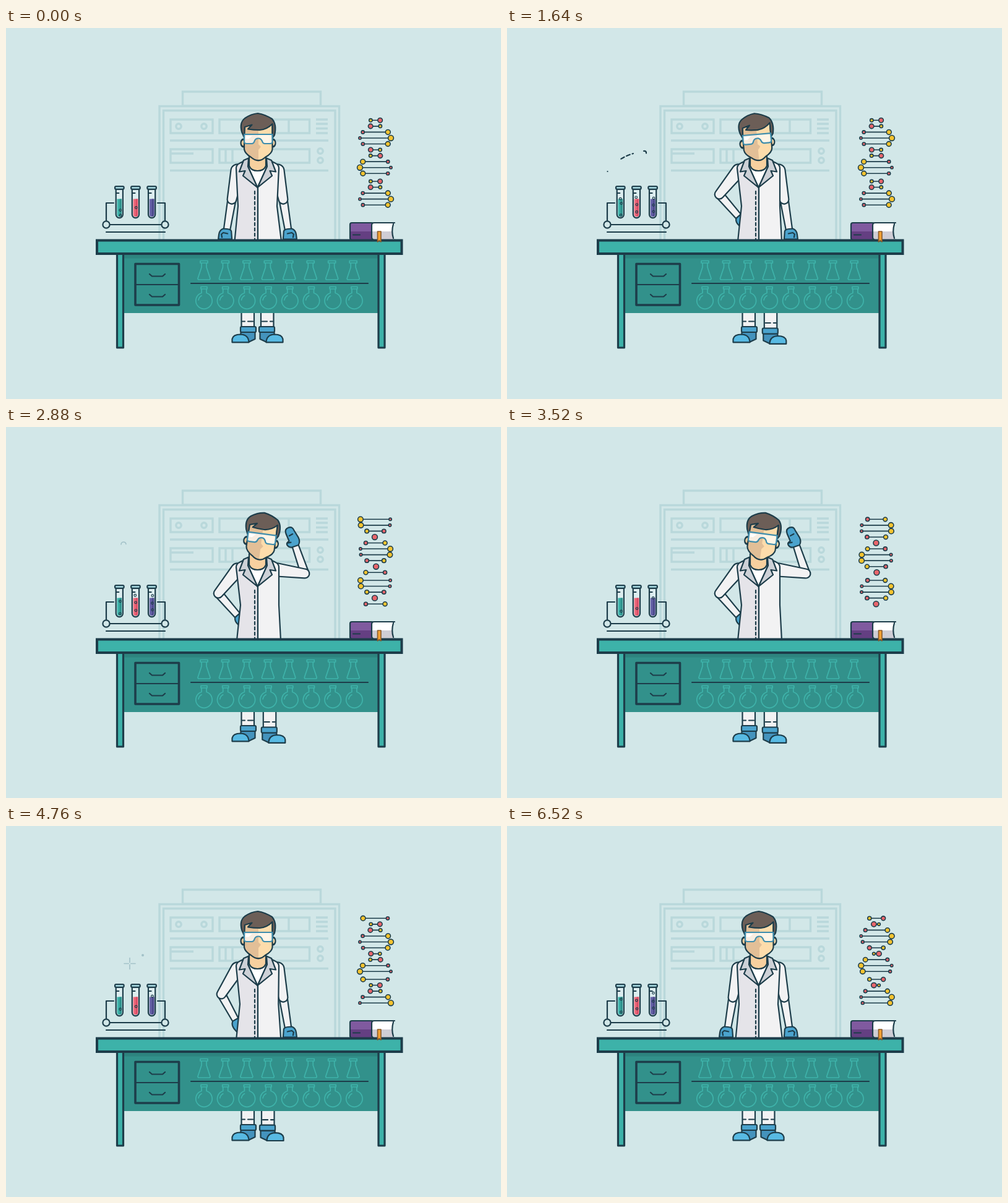
Recreate the animation shown at these times as an HTML page. Size 800 by 600 pixels, loop 6.56 s.

```html
<!DOCTYPE html>
<html lang="en">
<head>
<meta charset="utf-8">
<title>Laboratory</title>
<style>
html, body { margin: 0; width: 100%; height: 100%; overflow: hidden; background: #d2e7e8; }
svg { display: block; width: 800px; height: 600px; }
.ink { stroke: #1d3d4a; stroke-width: 2.2; stroke-linejoin: round; stroke-linecap: round; }
.line { fill: none; }
.pale { fill: none; stroke: #b9d8db; stroke-width: 3.4; }
.glass { fill: none; stroke: #3fb3aa; stroke-width: 1.7; stroke-linejoin: round; stroke-linecap: round; }
.spark { fill: none; stroke: #a2c1c8; stroke-width: 1.6; stroke-linecap: round; }
</style>
</head>
<body>
<svg id="stage" viewBox="0 0 800 600"></svg>
<script>
const LOOP = 6560, SPIN = 1640, FIZZ = 1200;
const YELLOW = '#f5c32f', RED = '#e8656b', COAT = '#f2f2f3', GLOVE = '#4ba3cd';

const path = (d, fill = 'none', cls = 'ink', more = '') =>
  `<path class="${cls}" d="${d}" fill="${fill}" ${more}/>`;
const rect = (x, y, w, h, fill = 'none', cls = 'ink', more = '') =>
  `<rect class="${cls}" x="${x}" y="${y}" width="${w}" height="${h}" fill="${fill}" ${more}/>`;
const circle = (x, y, r, fill = 'none', cls = 'ink', more = '') =>
  `<circle class="${cls}" cx="${x}" cy="${y}" r="${r}" fill="${fill}" ${more}/>`;
const group = (body, transform) => `<g transform="${transform}">${body}</g>`;
const mirror = body => group(body, 'translate(813 0) scale(-1 1)');

function machine() {
  const boxes = [[285.5, 103, 223, 23], [266, 148, 68, 22], [345, 148, 145.5, 22],
    [266, 196, 68, 22], [345, 196, 145.5, 22]];
  const dots = [[279, 159], [320, 159], [508, 199], [508, 214]];
  return path('M248 343V126.500H538.500V343M254.500 343V133.500H532V343M457 148V170M355 196V218M366 196V218' +
      'M266 203H303M265 182H521M265 230.500H521' +
      [148, 155, 162.5, 170].map(y => `M501 ${y}H520`).join(''), 'none', 'pale') +
    boxes.map(b => rect(...b, 'none', 'pale')).join('') +
    dots.map(([x, y]) => circle(x, y, 4.2, 'none', 'pale')).join('');
}

function desk() {
  let s = rect(189, 365, 413, 96, '#32918b', '') + rect(189, 366, 413, 6.5, '#2d847f', '');
  s += rect(179.5, 364, 10, 153, '#3db2a9', 'ink', 'style="stroke-width:3.2"');
  s += rect(602, 364, 10, 153, '#3db2a9', 'ink', 'style="stroke-width:3.2"');
  s += rect(147, 343.5, 492.5, 21.5, '#3db2a9', 'ink', 'style="stroke-width:4;stroke-linejoin:miter"');
  s += rect(209, 381.5, 70.5, 66.5, 'none', 'ink', 'style="stroke-width:3.6"');
  s += path('M209 415H279M232 398l4 3.500h17l4 -3.500M232 431l4 3.500h17l4 -3.500M299 413H585');
  for (let i = 0; i < 8; i++) {
    const x = 320 + i * 34.45, r = 320 + i * 34.7;
    s += path(`M${x - 6} 376.500h12v3.500h-12zM${x - 4} 380V387L${x - 10} 405Q${x - 10} 407 ${x - 8} 407` +
      `H${x + 8}Q${x + 10} 407 ${x + 10} 405L${x + 4} 387V380`, 'none', 'glass');
    s += path(`M${r - 5} 418.500h10v3.500h-10zM${r - 4} 422V428.500A13.200 13.200 0 1 0 ${r + 4} 428.500V422` +
      `M${r - 9} 440Q${r - 8} 435 ${r - 4} 433`, 'none', 'glass');
  }
  return s;
}

function rack() {
  let s = path('M174 283H162V313M245 283H257V313M167 318H252M162 330H257');
  s += circle(162, 318, 5.6, '#d2e7e8') + circle(257, 318, 5.6, '#d2e7e8');
  [[183.3, '#3db2a9', '#2f958f'], [209.4, '#ee6a7c', '#dd5068'], [235.6, '#6763a8', '#4f4b8e']].forEach(([x, c, d]) => {
    s += path(`M${x - 5.6} 261V301.500A5.600 5.600 0 0 0 ${x + 5.6} 301.500V261Z`, '#dcedef');
    s += path(`M${x - 3.8} 276.500H${x + 3.8}V301.500A3.800 3.800 0 0 1 ${x - 3.8} 301.500Z`, c, '');
    s += path(`M${x} 276.500H${x + 3.8}V301.500A3.800 3.800 0 0 1 ${x} 305Z`, d, '');
    s += path(`M${x - 5} 267h4`);
    s += rect(x - 7.3, 256, 14.6, 4.8, '#9fd0d8', 'ink', 'rx="2"');
  });
  return s;
}

function book() {
  return rect(556, 315, 38, 27.5, '#805a9f', '', 'rx="3"') + rect(556, 329, 38, 13.5, '#643f82', '') +
    rect(556, 315, 38, 27.5, 'none', 'ink', 'rx="3"') +
    path('M628 315H595Q591 315 591 319V338Q591 342.500 595 342.500H628Q624 337 624 329Q624 320 628 315Z', '#fff', '') +
    path('M591 329H624Q624 337 628 342.500H595Q591 342.500 591 338Z', '#cfcdd5', '') +
    path('M628 315H595Q591 315 591 319V338Q591 342.500 595 342.500H628M626 317Q622.500 329 626 340M561 334.500H572') +
    path('M600.500 329H606V346L603.200 343.500L600.500 346Z', '#f2a033', 'ink', 'style="stroke:#8a5a2b;stroke-width:1.6"');
}

const leg = path('M380.500 440V484H401V440Z', COAT) + path('M382 474.500H386M391 474.500H399') +
  path('M379.500 492H402.500V503L392 508H379Z', '#4493bd') +
  path('M365.500 508.300V503Q367 495.500 379 495.500Q392 496 392.500 508.300Z', '#58bae3') +
  rect(379, 483, 25, 9, GLOVE, 'ink', 'rx="2"');

const lapel = path('M392 210.500L384 214L377 232.500L386.500 231L383 239L406.500 258L391 224Z', '#cdd1d7');

const head = circle(383.5, 186, 4, '#f0cb9c', 'ink', 'transform="matrix(1 0 0 1.45 0 -83.7)"') +
  circle(431.5, 186, 4, '#fddcab', 'ink', 'transform="matrix(1 0 0 1.45 0 -83.7)"') +
  path('M385 158V196Q386 203 396 209Q408 219.500 419 209Q430 203 430.500 196V158Z', '#fddcab', '') +
  path('M385 158H408V188L412 192L408 197V214.500Q403 214 396 209Q386 203 385 196Z', '#e2bf97', '') +
  path('M385 158V196Q386 203 396 209Q408 219.500 419 209Q430 203 430.500 196V158') +
  path('M385 177L381 168Q377 153 386 146Q396 139 407 138Q419 140 430 147Q438 156 434 173L430.500 178V155' +
    'Q422 164 410 165Q400 165 391 163.500L397.500 156.500L386 160Z', '#6c5e57') +
  path('M385 172H430.500V184Q430.500 187 427 187H418.500Q415 187 414 183Q412 178.500 408 178.500' +
    'Q403 178.500 401.500 183Q400.500 187 397 187H389Q385 187 385 184Z', '#fff', '',
    'fill-opacity=".72" stroke="#3e8dac" stroke-width="2.2" stroke-linejoin="round"') +
  path('M387 174.500H398L392 179.500H387Z', '#fff', '');

const stage = document.getElementById('stage');
stage.innerHTML = machine() + `<g id="fx"></g>` + rack() + `<g id="bubbles"></g><g id="dna"></g>` +
  leg + `<g id="leg">${mirror(leg)}</g><g id="body"></g><g id="head">${head}</g>` + desk() + book();
const part = id => document.getElementById(id);
const layers = Object.fromEntries(['fx', 'bubbles', 'dna', 'leg', 'body', 'head'].map(id => [id, part(id)]));

const clamp = v => Math.max(0, Math.min(1, v));
const mix = (a, b, k) => a + (b - a) * k;
const ease = k => k < .5 ? 4 * k ** 3 : 1 - (2 - 2 * k) ** 3 / 2;
const ramp = (t, a, b) => ease(clamp((t - a) / (b - a)));
const polar = ([x, y], deg, len) => {
  const a = deg * Math.PI / 180;
  return [x + Math.cos(a) * len, y + Math.sin(a) * len];
};

function limb(from, deg, len, r1, r2) {
  const to = polar(from, deg, len);
  const at = (p, side, r) => polar(p, deg + side, r).map(v => v.toFixed(2)).join(' ');
  return path(`M${at(from, -90, r1)}L${at(to, -90, r2)}A${r2} ${r2} 0 0 1 ${at(to, 90, r2)}` +
    `L${at(from, 90, r1)}A${r1} ${r1} 0 0 1 ${at(from, -90, r1)}Z`, COAT);
}

const fist = path('M-8 16L-7 3Q-6 0 0 -.500L6 -1Q12 1 13 8L14 16Z', GLOVE) + path('M-1 7L6 5.500L9 8L8 13');
const mitten = path('M-6 2C-12 1 -14 -6 -10 -8L-7 -9L-8 -22Q-8 -30 -1 -30Q6 -30 6 -23L9 -10Q10 -2 5 2Z', GLOVE) +
  path('M-11 -7L-5 -6M-4 -17L2 -18');

function arm(shoulder, upper, upperLen, fore, resting, side) {
  const elbow = polar(shoulder, upper, upperLen), wrist = polar(elbow, fore, 49);
  const hand = resting
    ? group(fist, `translate(${wrist}) scale(${side} 1)`)
    : group(mitten, `translate(${wrist}) rotate(${fore + 90})`);
  return limb(elbow, fore, 49, 6.6, 5.2) + hand + limb(shoulder, upper, upperLen, 10.6, 7.4);
}

function body(hip, lift) {
  const waistL = mix(375, 379, hip), hemL = mix(369.5, 373, hip);
  const waistR = mix(438, 441, hip), hemR = mix(445, 444, hip);
  const left = `M407 213H389L378 218.500Q372 221 372 227L${waistL} 288L${hemL} 345H407Z`;
  const right = `M407 213H424L435 218.500Q441 221 441 227L${waistR} 288L${hemR} 345H407Z`;
  return arm([374, 231], mix(101, 129, hip), mix(47, 49, hip), mix(99.3, 49, hip), hip < .12, -1) +
    arm([439, 231], mix(79, 7.8, lift), mix(47, 44.5, lift), mix(80.7, -109, lift), lift < .06, 1) +
    path(left, '#e5e4e9') + path(right, COAT) +
    path('M402 264V343', 'none', 'ink', 'stroke-dasharray="4.5 4"') +
    path('M391 214H422V224L406.500 258L391 224Z', '#fff') +
    path('M393 205V223Q396 231 406.500 231Q417 231 420 223V205Z', '#f7d09f') +
    lapel + mirror(lapel);
}

function dna(t) {
  let s = '';
  for (let i = 0; i < 15; i++) {
    const y = 149.3 + i * 9.55 + (i > 9 ? 3.2 : 0);
    const c = Math.cos((i - 3 + t / SPIN * 10) * Math.PI / 5), a = Math.abs(c);
    const thin = 'style="stroke-width:1.6"';
    s += path(`M${597 - 25 * c} ${y}H${597 + 25 * c}`, 'none', 'ink', thin);
    s += circle(597 + 25 * c, y, 1.9 + 2.5 * a, YELLOW, 'ink', thin);
    s += circle(597 - 25 * c, y, 4.5 - 2.4 * a, RED, 'ink', thin);
  }
  return s;
}

// x, start y, birth, life, speed in px per second
const fizz = [
  [184, 303, 1000, 650, 42], [185, 303, 0, 640, 44], [184, 303, 430, 450, 24],
  [209.5, 297, 1030, 660, 38], [209.5, 301, 90, 640, 44], [209.5, 298, 420, 450, 24],
  [237, 300, 40, 560, 62], [236.5, 300, 60, 940, 36], [236, 302, 270, 910, 30]
];
const bubbles = t => fizz.map(([x, y, birth, life, speed]) => {
  const age = (t - birth + 2 * FIZZ) % FIZZ;
  return age < life
    ? circle(x + Math.sin(age / 130) * .8, y - age * speed / 1000, 1.8, 'none', 'ink', 'style="stroke-width:1.2"') : '';
}).join('');

function ring(x, y, age) {
  if (age < 0 || age > 850) return '';
  const r = 1 + 3 * clamp(age / 350);
  if (age < 70) return circle(x, y, 2, '#a2c1c8', '');
  const left = 1 - clamp((age - 400) / 450), len = 2 * Math.PI * r;
  return circle(x, y, r, 'none', 'spark',
    `stroke-dasharray="${left * len} ${len}" transform="rotate(180 ${x} ${y})"`);
}

function sparkle(age) {
  if (age < 0 || age > 1400) return '';
  let s = '';
  const outer = 9 * clamp(age / 250), inner = 9 * clamp((age - 150) / 550);
  if (inner < outer) {
    for (let a = 0; a < 360; a += 90) {
      s += path(`M${polar([200, 222.5], a, inner)}L${polar([200, 222.5], a, outer)}`, 'none', 'spark');
    }
  }
  return s + ring(221, 209, age - 225) + ring(190, 190, age - 500);
}

function trail(t) {
  const tip = 52 * ramp(t, 200, 1000), tail = 52 * clamp((t - 1250) / 720);
  let dash = '0', gap = 0;
  for (let d = 0; d < 52; d += 10) {
    const from = Math.max(d, tail), to = Math.min(d + 6, tip);
    if (to > from) { dash += ` ${from - gap} ${to - from}`; gap = to; }
  }
  if (!gap) return '';
  const hook = t > 900 && t < 1760 ? path('M221 199Q225.500 198.500 225 202.500') : '';
  return path('M162.500 232Q179 210 204 203', 'none', 'ink', `stroke-dasharray="${dash} 99"`) + hook;
}

function draw(t) {
  const step = ramp(t, 200, 1040) - ramp(t, 4240, 5120);
  const hip = ramp(t, 200, 1080) - ramp(t, 4400, 5320);
  const lift = ramp(t, 1680, 2400) - ramp(t, 3480, 4080);
  const tilt = -5 * ramp(t, 200, 1000) + 12.5 * ramp(t, 1700, 2520) - 7.5 * ramp(t, 3480, 4080);
  layers.leg.setAttribute('transform', `translate(${3.8 * step} ${2.5 * step})`);
  layers.head.setAttribute('transform', `rotate(${tilt} 406 221)`);
  layers.body.innerHTML = body(hip, lift);
  layers.dna.innerHTML = dna(t);
  layers.bubbles.innerHTML = bubbles(t);
  layers.fx.innerHTML = trail(t) + sparkle(t - 1740) + sparkle(t - 4500);
}

const start = performance.now();
function tick() {
  draw((performance.now() - start) % LOOP);
  requestAnimationFrame(tick);
}
tick();
</script>
</body>
</html>
```
